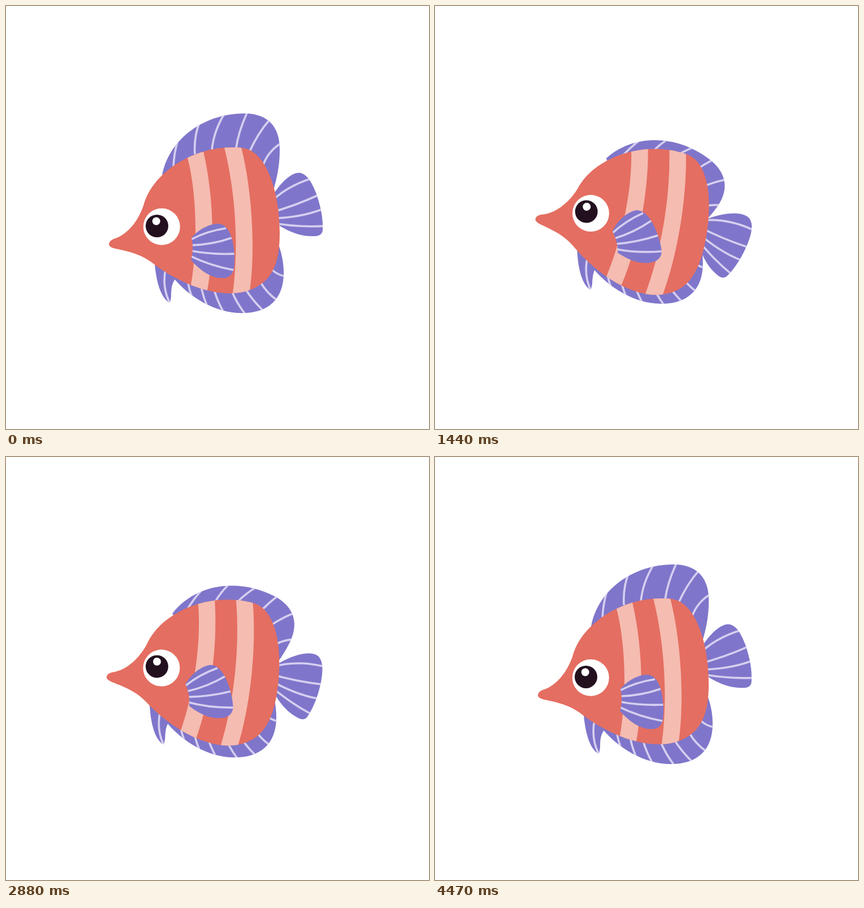
Write an HTML page with a canvas that moves like this. It is 748 px wide and 748 px high and loops after 4.5 s.

```html
<!DOCTYPE html>
<html lang="en">
<head>
<meta charset="utf-8">
<title>Swimming fish</title>
<style>
html, body { margin: 0; height: 100%; overflow: hidden; background: #fff; }
canvas { display: block; }
</style>
</head>
<body>
<canvas id="stage" width="748" height="748"></canvas>
<script>
const ctx = document.getElementById('stage').getContext('2d');
const LOOP = 4500, SWIM = 2250;
const CORAL = '#e46e61', PINK = '#f5bcb1', VIOLET = '#7f76cb', RAY = '#d6cff0', INK = '#23101f';

// Shapes are drawn at the nose-down extreme of the swing.
const body = new Path2D(`M182 421C183 414 190 412 196 410C220 400 236 374 243 353
  C251 325 268 303 297 282C330 260 367 249 405 250C425 250 435 255 445 265
  C470 290 484 345 484 402C484 440 477 465 462 482C447 498 425 508 396 508
  C352 508 304 487 265 459C242 440 222 435 193 429C186 427 182 425 182 421Z`);
const stripes = new Path2D(`M318 255L321 268C338 335 339 425 327 493L325 515H354L356 503
  C370 425 367 335 349 257L346 245Z
  M384 240L386 250C406 330 412 425 401 508V515H429L431 504C442 425 434 320 416 250L414 240Z`);

// swing: degrees per unit of swim, relative to the body
const fin = (x, y, swing, outline, rays) =>
  ({ x, y, swing, outline: new Path2D(outline), rays: new Path2D(rays) });

const dorsal = fin(302.3, 304.8, 15.2,
  'M276 300C288 235 350 190 422 190C462 190 485 213 484 255C484 280 480 300 474 322L440 335H330Z',
  `M296 285Q297 260 304 237M334 262Q332 232 342 206M364 255Q367 222 386 191
   M407 251Q411 222 427 187M430 259Q445 225 467 200M454 283Q463 257 486 243`);
const tail = fin(456.5, 374, 18.6,
  `M464 350C475 325 500 293 520 295C534 298 542 315 548 330C556 352 561 375 560 395
   C560 405 552 407 545 407C520 408 498 399 470 380Z`,
  `M462 353Q492 320 540 305M462 367Q510 354 553 334
   M462 376Q520 375 560 359M462 382Q515 392 563 389`);
const anal = fin(310, 465, -7.35,
  `M297 482C325 515 370 543 417 543C462 543 491 520 491 472C491 455 488 440 483 425
   L440 430L340 450Z`,
  `M322 490Q324 502 329 515M346 500Q349 515 356 531M369 505Q374 522 385 542
   M400 506Q408 525 423 545M425 503Q436 520 453 537M451 490Q461 507 479 520M471 467Q480 475 493 478`);
const pelvic = fin(284, 440, -6.4,
  'M262 440C264 490 275 516 288 524C291 525 291 520 292 514C292 500 293 490 300 482V450Z',
  'M282 466Q276 497 289 524');
const pectoral = fin(330, 428, -17.2,
  `M328 410C340 396 358 385 376 385C392 386 398 405 401 417C404 435 405 450 403 464
   C401 478 390 482 381 481C360 481 340 464 327 449C331 437 331 422 328 410Z`,
  `M327 413Q355 398 389 393M328 423Q365 422 399 410
   M328 433Q365 440 406 438M326 442Q360 459 403 467`);

function rotate(x, y, degrees) {
  ctx.translate(x, y);
  ctx.rotate(degrees * Math.PI / 180);
  ctx.translate(-x, -y);
}

function drawFin(f, swim) {
  ctx.save();
  rotate(f.x, f.y, f.swing * swim);
  ctx.fillStyle = VIOLET;
  ctx.fill(f.outline);
  ctx.clip(f.outline);
  ctx.strokeStyle = RAY;
  ctx.lineWidth = 3.6;
  ctx.stroke(f.rays);
  ctx.restore();
}

function drawBody() {
  ctx.save();
  ctx.fillStyle = CORAL;
  ctx.fill(body);
  ctx.clip(body);
  ctx.fillStyle = PINK;
  ctx.fill(stripes);
  ctx.restore();
}

function disc(x, y, r, color) {
  ctx.fillStyle = color;
  ctx.beginPath();
  ctx.arc(x, y, r, 0, 2 * Math.PI);
  ctx.fill();
}

function drawEye(open) {
  const tilt = -6 * Math.PI / 180;
  ctx.save();
  ctx.translate(275.3, 390.3);
  ctx.rotate(tilt);
  ctx.scale(1, open);
  ctx.rotate(-tilt);
  disc(0, 0, 32.5, '#fff');
  disc(-8.3, -1.3, 20, INK);
  disc(-9.6, -9.8, 7, '#fff');
  ctx.restore();
}

// One blink per loop, centred on 2400 ms.
function eyeOpenness(time) {
  const d = Math.min(1, Math.abs(time - 2400) / 180);
  return 0.2 + 0.8 * (1 - Math.cos(Math.PI * d)) / 2;
}

const swimAt = phase => 1 - Math.cos(2 * Math.PI * phase);

// The tail follows the swim, but comes back at a more even speed.
function tailAt(phase) {
  if (phase < 0.5) return swimAt(phase);
  const even = 2 * (1 - (2 * phase - 1) ** 1.25);
  return swimAt(phase) * 0.4 + even * 0.6;
}

function draw(time) {
  const phase = time / SWIM % 1, swim = swimAt(phase);
  ctx.fillStyle = '#fff';
  ctx.fillRect(0, 0, 748, 748);
  ctx.save();
  rotate(381.5, 379.2, 7.8 * swim);
  drawFin(dorsal, swim);
  drawFin(tail, tailAt(phase));
  drawFin(anal, swim);
  drawFin(pelvic, swim);
  drawBody();
  drawEye(eyeOpenness(time));
  drawFin(pectoral, swim);
  ctx.restore();
}

function tick() {
  draw(performance.now() % LOOP);
  requestAnimationFrame(tick);
}
tick();
</script>
</body>
</html>
```
